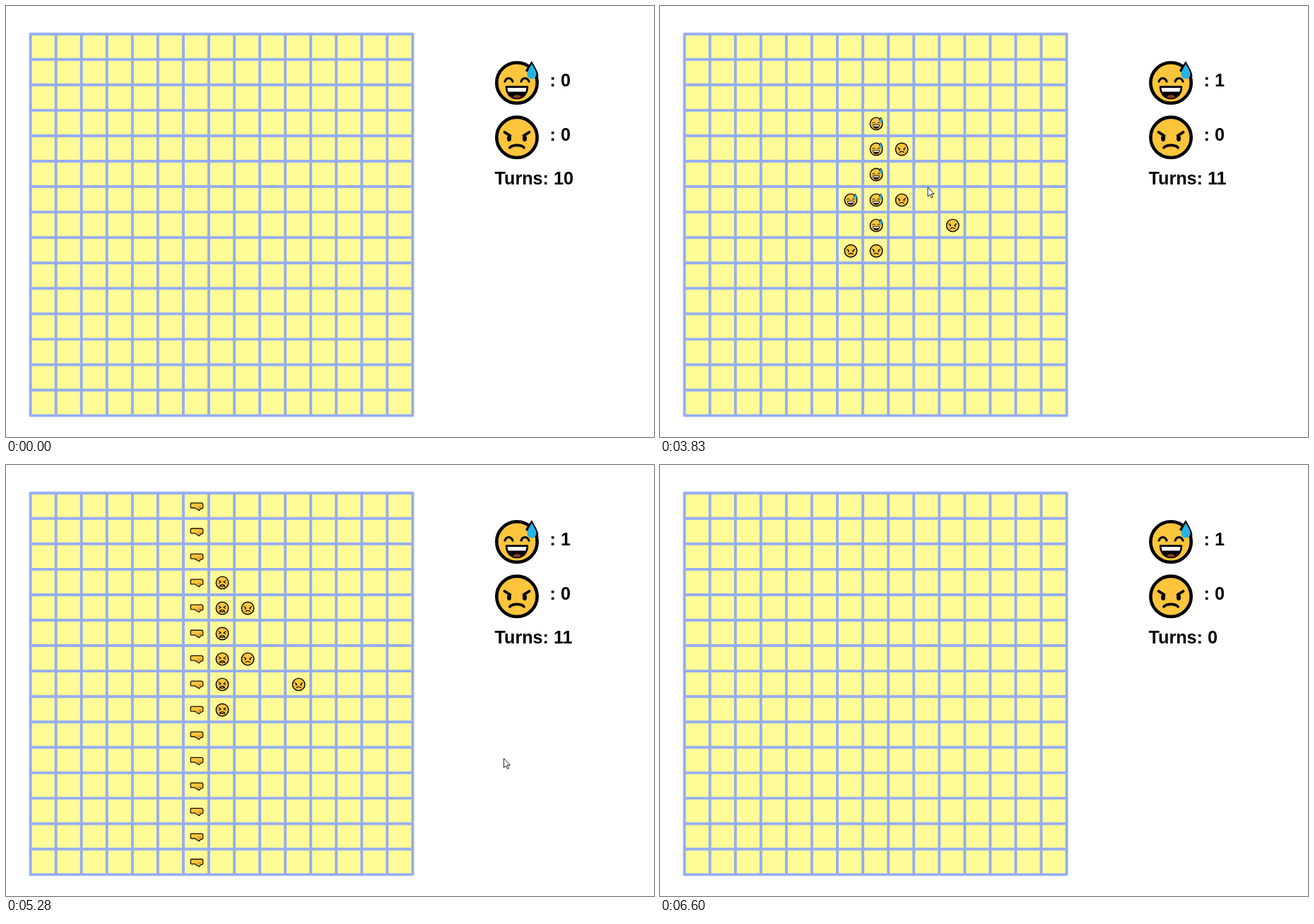
An HTML page for the animation above (7320 ms loop, 917 by 611 pixels).

```html
<!DOCTYPE html>
<html lang="en">
<head>
<meta charset="utf-8">
<title>Emoji five in a row</title>
<style>
  html, body { margin: 0; width: 100%; height: 100%; overflow: hidden; background: #fff; }
  svg { display: block; width: 917px; height: 611px; }
  text { font: bold 25.2px "Liberation Sans", Arial, sans-serif; white-space: pre; }
  .line { fill: none; stroke: #000; stroke-linecap: round; stroke-linejoin: round; }
</style>
</head>
<body>
<svg viewBox="0 0 917 611">
  <defs>
    <circle id="head" r="28.7" fill="#fdc53c" stroke="#000" stroke-width="4.6"/>

    <g id="sweat">
      <use href="#head"/>
      <path class="line" stroke-width="3.2" d="M-17-2C-15-8-8-8-6-2M6-2C8-8 15-8 17-2"/>
      <path d="M-15 5.500H15C15 15 9 22 0 22S-15 15-15 5.500Z" stroke="#000" stroke-width="2.500" stroke-linejoin="round"/>
      <path d="M-13.500 7H13.500L12.500 12.500H-12.500Z" fill="#fff"/>
      <path d="M-6 20C-4 16 4 16 6 20C3 22 -3 22 -6 20Z" fill="#8c3b22"/>
      <path d="M21-31C18-26 14-22 12-17L30-7C32-14 25-23 21-31Z"/>
      <path d="M21-27C18-21 14.500-17 14.500-12A6.500 6.500 0 0 0 27.500-12C27.500-17 24-21 21-27Z" fill="#23b4e8"/>
    </g>

    <g id="angry">
      <use href="#head"/>
      <path class="line" stroke-width="3.800" d="M-17.500-7.500L-9.500-2.500M17.500-7.500L9.500-2.500M-10 14.500C-6 10 6 10 10 14.500"/>
      <ellipse cx="-11" cy="1.500" rx="3" ry="4.200"/>
      <ellipse cx="11" cy="1.500" rx="3" ry="4.200"/>
    </g>

    <g id="hurt">
      <use href="#head"/>
      <path class="line" stroke-width="3.600" d="M-16-10L-6-4L-15 1M16-10L6-4L15 1M-12 18C-11 5 11 5 12 18L6 14L0 18L-6 14Z"/>
    </g>

    <g id="fist">
      <path d="M-7.500-4.800H6.500Q8.700-4.800 8.700-2.500V1.500Q8.700 3 6.500 3H5.500L3.500 5.700L0 3.800L-2.500 2H-7.500Q-8.700 2-8.700 .8V-3.600Q-8.700-4.800-7.500-4.800Z"
        fill="#fdc53c" stroke="#1a1204" stroke-width="1.300" stroke-linejoin="round"/>
      <path d="M1-.5H7V2H4L3 4L1 2.500Z" fill="#e9a12a"/>
    </g>
  </defs>

  <path id="grid" fill="#fffb96" stroke="#95adf3" stroke-width="3.900" stroke-linecap="round" stroke-linejoin="round"/>
  <g id="faces"></g>
  <g id="fists"></g>

  <use href="#sweat" x="723" y="109"/>
  <use href="#angry" x="723" y="186.300"/>
  <text id="score" x="769.5" y="114">: 0</text>
  <text x="769.5" y="191">: 0</text>
  <text id="turns" x="691.5" y="253">Turns: 10</text>

  <path id="cursor" d="M.5.5V13.500L3.500 10.700L5.500 15.300L7.500 14.400L5.500 9.900H9.500Z"
    fill="#fff" stroke="#222"/>
</svg>
<script>
const LOOP = 7320, FRAME = 69, PHASE = 28;
const SIZE = 15, PITCH = 36.06, LEFT = 34.6, TOP = 39.7;
const PLACED = 2660; // the winning face lands
const PUNCH = 4401, PUNCH_STEP = 133, ROW_LAG = 1.4;
const CLEARED = PUNCH + SIZE * (PUNCH_STEP + ROW_LAG);
const ENTER = 260, EXIT = 6420;

// Rows 3 to 8, columns 6 to 10: S is sweat, A is angry.
const layout = [".S...", ".SA..", ".S...", "SSA..", ".S..A", "AA..."];

// Pointer strokes: start, end, and where each one leads.
const origin = [810, 597];
const strokes = [
  [ENTER, 460, 383, 311], [720, 1420, 296, 198], [1490, 1770, 306, 174],
  [2170, 2500, 310, 180], [2520, 3210, 327, 199], [3280, 3560, 378.5, 256.5],
  [3830, 4580, 422, 273], [4590, 5270, 704, 415.5], [6050, EXIT, 857, 584]
];

const $ = id => document.getElementById(id);
const place = (el, x, y, scale = 1) =>
  el.setAttribute("transform", `translate(${x} ${y}) scale(${scale})`);
const placeInCell = (el, col, row, scale) =>
  place(el, LEFT + 1 + PITCH * (col + 0.5), TOP + 1 + PITCH * (row + 0.5), scale);
const show = (el, on) => { el.style.visibility = on ? "visible" : "hidden"; };

function add(parent, symbol) {
  const el = document.createElementNS("http://www.w3.org/2000/svg", "use");
  el.setAttribute("href", "#" + symbol);
  return parent.appendChild(el);
}

const span = SIZE * PITCH;
let lines = `M${LEFT} ${TOP}h${span}v${span}h${-span}z`;
for (let i = 1; i < SIZE; i++) {
  lines += `M${LEFT + i * PITCH} ${TOP}v${span}M${LEFT} ${TOP + i * PITCH}h${span}`;
}
$("grid").setAttribute("d", lines);

const faces = [];
layout.forEach((cells, i) => [...cells].forEach((mark, j) => {
  if (mark === ".") return;
  const mood = mark === "S" ? "sweat" : "angry";
  const face = { el: add($("faces"), mood), mood, col: j + 6, row: i + 3, from: i ? 0 : PLACED };
  placeInCell(face.el, face.col, face.row, 0.305);
  faces.push(face);
}));
const fists = Array.from({ length: SIZE }, () => add($("fists"), "fist"));

// Rows are redrawn one after another, a moment apart.
const fistCol = (t, row) => Math.floor((t - PUNCH - row * ROW_LAG) / PUNCH_STEP);

function pointer(t) {
  let [x, y] = origin;
  for (const [start, end, toX, toY] of strokes) {
    const k = Math.min(1, Math.max(0, (t - start) / (end - start)));
    x += (toX - x) * k;
    y += (toY - y) * k;
  }
  return [x, y];
}

function render(time) {
  const t = Math.floor((time - PHASE) / FRAME) * FRAME + PHASE;

  for (const { el, mood, col, row, from } of faces) {
    const ahead = col - fistCol(t, row);
    show(el, t >= from && ahead > 0);
    el.setAttribute("href", "#" + (ahead === 1 ? "hurt" : mood));
  }
  fists.forEach((el, row) => {
    const col = fistCol(t, row);
    show(el, col >= 0 && col < SIZE);
    placeInCell(el, col, row);
  });

  $("score").textContent = t < PLACED ? ": 0" : ": 1";
  $("turns").textContent = "Turns: " + (t < PLACED ? 10 : t < CLEARED ? 11 : 0);

  show($("cursor"), t >= ENTER && t < EXIT);
  place($("cursor"), ...pointer(t));
}

const begin = performance.now();
function tick() {
  render((performance.now() - begin) % LOOP);
  requestAnimationFrame(tick);
}
tick();
</script>
</body>
</html>
```
